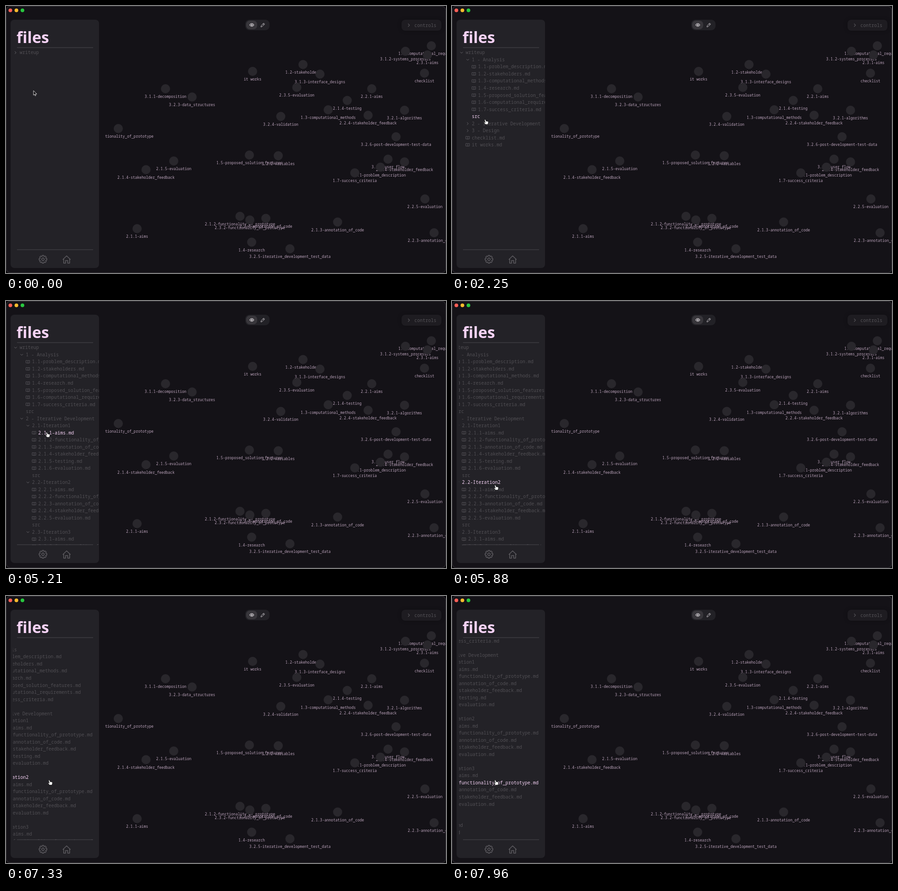
Recreate the animation shown at these times as an HTML page with a canvas. Size 960 by 584 pixels, loop 8 s.

```html
<!DOCTYPE html>
<html lang="en">
<head>
<meta charset="utf-8">
<title>files</title>
<style>
html, body { margin: 0; width: 100%; height: 100%; overflow: hidden; background: #141217; }
canvas { display: block; width: 960px; height: 584px; }
</style>
</head>
<body>
<canvas id="stage" width="960" height="584"></canvas>
<script>
const ctx = document.getElementById('stage').getContext('2d');
const LOOP = 8000;
const MONO = '"Noto Sans Mono", "DejaVu Sans Mono", monospace';
const ROW = 15.52, FIRST = 102, STEP = 13.5;
const PANEL = '#232227', PINK = '#f6d3f6', DIM = '#514f54';

const nodes = [
  ['2.2.2-functionality_of_prototype', 245, 268], ['3.1.1-decomposition', 348, 181],
  ['3.2.3-data_structures', 406, 199], ['it works', 538, 143],
  ['1.2-stakeholders', 648, 128], ['3.1.3-interface_designs', 685, 149],
  ['2.3.5-evaluation', 634.5, 178], ['2.2.1-aims', 798, 181],
  ['2.1.4-testing', 744.5, 206.5], ['1.3-computational_methods', 703, 227],
  ['2.2.4-stakeholder_feedback', 790, 239], ['3.2.1-algorithms', 869.5, 228],
  ['3.2.4-validation', 599.5, 241.5], ['1.6-computational_requirements', 928, 87],
  ['3.1.2-systems_processes', 871.5, 99], ['2.3.1-aims', 919.5, 107],
  ['checklist', 913, 147], ['3.2.6-post-development-test-data', 851, 286],
  ['3.1.4-user_flow', 833.5, 335], ['2.3.4-stakeholder_feedback', 869.5, 341],
  ['1.1-problem_description', 817, 352.5], ['1.7-success_criteria', 761, 365],
  ['1.5-proposed_solution_features', 531, 326], ['3.2.2-variables', 594, 327.5],
  ['2.1.5-evaluation', 366, 339], ['2.1.4-stakeholder_feedback', 305.5, 358],
  ['2.1.1-aims', 286, 487], ['2.1.2-functionality_of_prototype', 510.5, 460],
  ['2.3.2-functionality_of_prototype', 532, 468], ['2.3.3-annotation_of_code', 567, 464.5],
  ['1.4-research', 536, 516.5], ['3.2.5-iterative_development_test_data', 619.5, 531],
  ['2.1.3-annotation_of_code', 723.5, 472.5], ['2.2.5-evaluation', 914, 422],
  ['2.2.3-annotation_of_code', 934, 496]
];

const folder = (name, opensAt, kids) => ({ name, opensAt, kids });
const files = (prefix, names) =>
  names.split(' ').map((n, i) => ({ name: `${prefix}${i + 1}-${n}.md` })).concat({ name: 'src', bare: true });
const iteration = (n, opensAt, extra) => folder(`2.${n}-Iteration${n}`, opensAt, files(`2.${n}.`,
  `aims functionality_of_prototype annotation_of_code stakeholder_feedback ${extra}evaluation`));

const tree = folder('writeup', 720, [
  folder('1 - Analysis', 1300, files('1.', 'problem_description stakeholders computational_methods ' +
    'research proposed_solution_features computational_requirements success_criteria')),
  folder('2 - Iterative Development', 2700, [
    iteration(1, 4700, 'testing '), iteration(2, 4080, ''), iteration(3, 3420, '')
  ]),
  folder('3 - Design', Infinity, []),
  { name: 'checklist.md' },
  { name: 'it works.md' }
]);

// time, x, y of the pointer tip
const path = [
  [40, 60, 185.5], [560, 48, 104], [880, 48, 104], [1160, 56, 118], [1710, 56, 118],
  [2250, 72, 248], [2460, 74, 257], [2780, 74, 257], [3180, 78, 303], [3520, 78, 303],
  [3860, 82.5, 291], [4250, 82.5, 291], [4560, 85, 273], [5000, 85, 273],
  [5200, 88.5, 287], [5230, 88.5, 287], [5420, 94, 402.5]
];

function ease(t, from, to) {
  const p = Math.min(1, Math.max(0, (t - from) / (to - from)));
  return p * p * (3 - 2 * p);
}

function pointerAt(t) {
  let [, x, y] = path[0];
  for (let i = 1; i < path.length; i++) {
    const k = ease(t, path[i - 1][0], path[i][0]);
    x += (path[i][1] - path[i - 1][1]) * k;
    y += (path[i][2] - path[i - 1][2]) * k;
  }
  return { x, y };
}

const scrollX = t => 91.5 * ease(t, 5670, 6170);
const scrollY = t => 128 * ease(t, 7330, 7655);

function visibleRows(t, item = tree, depth = 0, out = []) {
  const open = item.kids && t >= item.opensAt;
  out.push({ item, depth, open });
  if (open) item.kids.forEach(kid => visibleRows(t, kid, depth + 1, out));
  return out;
}

function text(str, x, y, size, color, align = 'left') {
  ctx.font = `${size}px ${MONO}`;
  ctx.textAlign = align;
  ctx.fillStyle = color;
  ctx.fillText(str, x, y);
}

function box(x, y, w, h, r, color) {
  ctx.fillStyle = color;
  ctx.beginPath();
  ctx.roundRect(x, y, w, h, r);
  ctx.fill();
}

function disc(x, y, r, color) {
  ctx.fillStyle = color;
  ctx.beginPath();
  ctx.arc(x, y, r, 0, 7);
  ctx.fill();
}

function icon(d, x, y, color, width, fill) {
  ctx.save();
  ctx.translate(x, y);
  ctx.lineJoin = ctx.lineCap = 'round';
  ctx.lineWidth = width;
  ctx.strokeStyle = color;
  const p = new Path2D(d);
  if (fill) { ctx.fillStyle = fill; ctx.fill(p); }
  ctx.stroke(p);
  ctx.restore();
}

function clip(x, y, w, h, draw) {
  ctx.save();
  ctx.beginPath();
  ctx.rect(x, y, w, h);
  ctx.clip();
  draw();
  ctx.restore();
}

function drawGraph() {
  for (const [name, x, y] of nodes) {
    disc(x, y, 10, '#29272c');
    text(name, x, y + 20, 8, '#bda5bd', 'center');
  }
}

function drawWindow() {
  ctx.fillStyle = '#08070a';
  ctx.fillRect(0, 0, 960, 584);
  box(0, 0, 960, 584, 9, '#141217');
  clip(216, 0, 744, 584, drawGraph);
  ctx.strokeStyle = '#39373c';
  ctx.lineWidth = 1;
  ctx.beginPath();
  ctx.roundRect(.5, .5, 959, 583, 9);
  ctx.stroke();
  ['#ff5f57', '#febc2e', '#28c840'].forEach((c, i) => disc(9.5 + 13.2 * i, 9.5, 4, c));

  box(522, 30, 53, 23, 9, '#222126');
  box(524, 32, 24, 19, 8, '#38363b');
  icon('M-4.5 0Q0-6.4 4.5 0Q0 6.4-4.5 0Z', 536.3, 41.5, '#f2eef2', 1.1);
  disc(536.3, 41.5, 1.5, '#f2eef2');
  icon('M-4 4L-3.4 1.4L2-4L4-2L-1.4 3.4ZM.6-2.6L2.6-.6', 560.3, 41.5, '#c9c5ca', 1);

  ctx.save();
  ctx.shadowColor = 'rgba(0,0,0,.25)';
  ctx.shadowBlur = 8;
  box(863, 30, 87, 24, 8, '#1e1c21');
  ctx.restore();
  icon('M-1.5-3L1.5 0L-1.5 3', 879, 42, '#555358', 1.1);
  text('controls', 891, 45.5, 10, '#555358');
}

function drawRow({ item, depth, open }, y, hot) {
  const x = 29.8 + STEP * (item.bare ? depth - 1 : depth);
  const color = hot ? PINK : DIM;
  if (item.kids) icon(open ? 'M-2.5-1.2L0 1.3L2.5-1.2' : 'M-1.3-2.5L1.3 0L-1.3 2.5', x - 9, y, '#67656a', 1);
  else if (!item.bare) icon('M-3.8-3H-1Q0-3 0-2Q0-3 1-3H3.8V2.6H1Q0 2.6 0 3.4Q0 2.6-1 2.6H-3.8ZM0-2V3', x - 9, y, '#5b595e', .9);
  text(item.name, x, y + 3.4, 10, color);
}

function drawPanel(t, rows, hot) {
  box(10, 30, 193, 543, 8, PANEL);
  ctx.textAlign = 'left';
  ctx.fillStyle = PINK;
  ctx.font = '600 34px "Noto Sans", "Open Sans", sans-serif';
  ctx.fillText('files', 23, 80.5);

  clip(15, 92, 188, 442, () => {
    ctx.translate(-scrollX(t), -scrollY(t));
    rows.forEach((row, i) => drawRow(row, FIRST + ROW * i, i === hot));
  });

  ctx.fillStyle = '#4b494e';
  ctx.fillRect(24, 90.5, 166, 1);
  ctx.fillRect(24, 532.5, 166, 1);

  ctx.globalAlpha = ease(t, 7330, 7400) * (1 - ease(t, 7780, 7940));
  box(190, 94.5 + scrollY(t) * 439 / 567, 5, 337, 2.5, '#77757a');
  ctx.globalAlpha = 1;

  drawGear(80.7, 554);
  icon('M-8-.3L0-8L8-.3M-6.5-1.5V8H-2.3V2.2H2.3V8H6.5V-1.5', 132.3, 554.5, '#5f5d62', 1.5);
}

function drawGear(x, y) {
  let d = '';
  for (let i = 0; i < 8; i++) {
    [[-.32, 6.5], [-.2, 8.7], [.2, 8.7], [.32, 6.5]].forEach(([da, r], k) => {
      const a = i * Math.PI / 4 + da;
      d += `${i + k ? 'L' : 'M'}${(r * Math.cos(a)).toFixed(2)} ${(r * Math.sin(a)).toFixed(2)}`;
    });
  }
  icon(d + 'ZM2.8 0A2.8 2.8 0 1 1-2.8 0A2.8 2.8 0 1 1 2.8 0Z', x, y, '#5f5d62', 1.4);
}

function drawPointer({ x, y }, hand) {
  if (hand) {
    icon('M-1 .8Q.2-.6 1.2.8L2.6 4.2Q3.7 3.4 4.4 4.2Q5.5 3.6 6 4.6Q7.2 4.4 7.3 5.6L7 8.6L6 11H1L-1.8 7.4Q-2.8 5.6-1.2 5.8L.4 7Z',
      x, y, '#111', .8, '#fff');
  } else {
    icon('M0 0V9.6L2.2 7.6L3.7 11L5.3 10.3L3.8 7H6.8Z', x, y, '#eee', .9, '#0c0b0d');
  }
}

function frame(now) {
  const t = now % LOOP;
  const rows = visibleRows(t);
  const pointer = pointerAt(t);
  // the hovered row lags a little behind the scroll
  const hot = Math.round((pointer.y + scrollY(t - 60) - FIRST) / ROW);
  drawWindow();
  drawPanel(t, rows, hot);
  drawPointer(pointer, hot >= 0 && hot < rows.length);
  requestAnimationFrame(frame);
}
requestAnimationFrame(frame);
</script>
</body>
</html>
```
